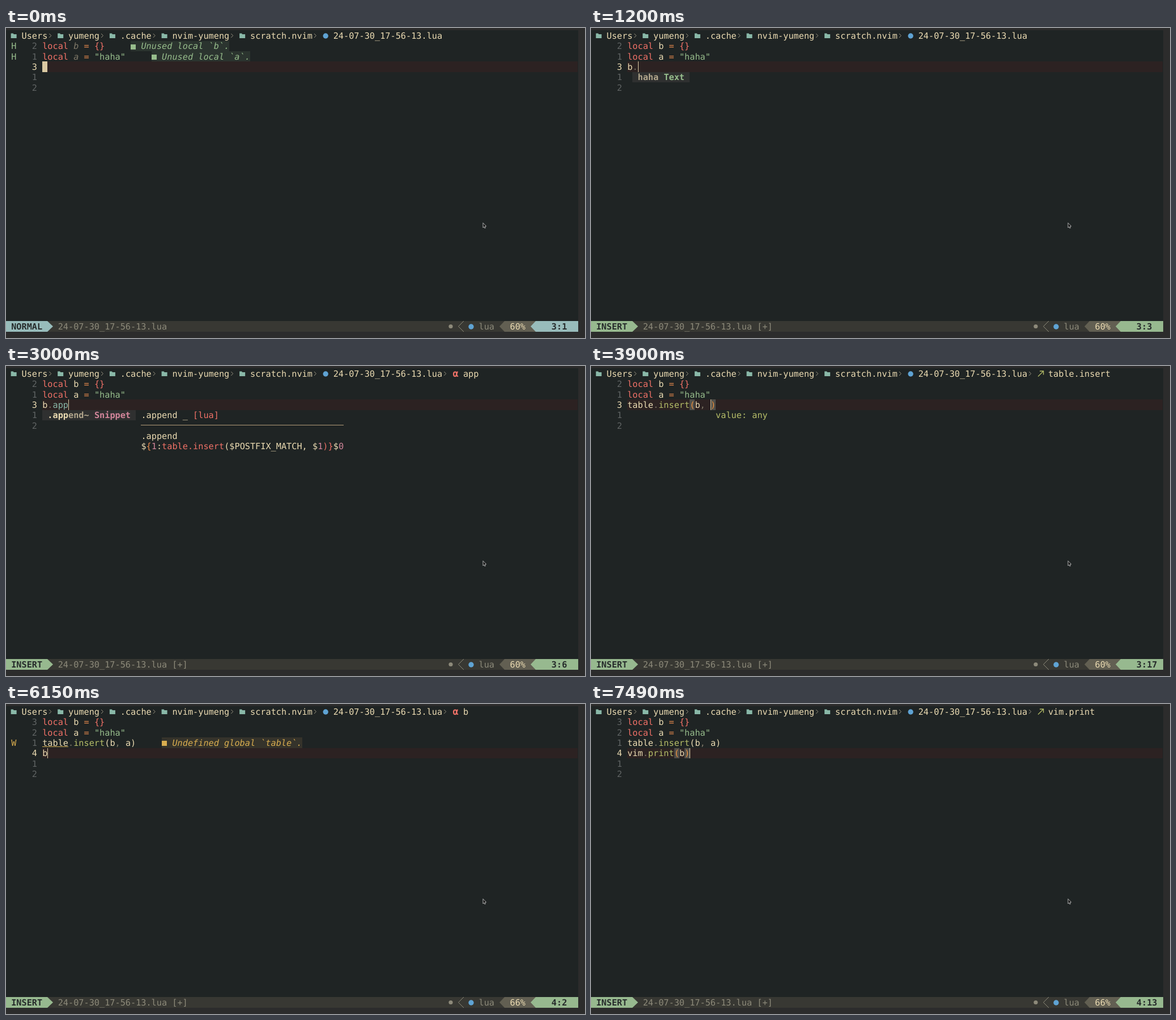
An HTML page with a canvas for the animation above (8000 ms loop, 1022 px wide and 548 px high).

```html
<!DOCTYPE html>
<html lang="en">
<head>
<meta charset="utf-8">
<title>Postfix snippets in an editor</title>
<style>
html, body { margin: 0; width: 100%; height: 100%; overflow: hidden; background: #2c2c2c; }
canvas { display: block; }
</style>
</head>
<body>
<canvas id="stage" width="1022" height="548"></canvas>
<script>
const ctx = document.getElementById('stage').getContext('2d');
const CELL = 9.17, ROW = 18.36, TOP = 4.4, LOOP = 8000;
const BG = '#1f2424', BAR = '#383833', PERCENT = '#625f52', CURSOR = '#dac9a2';

// Colour codes used in marked-up text: "§rlocal §fb" is red, then foreground.
const INK = {
  f: '#ebdbb2', r: '#f07167', o: '#e78a4e', g: '#97bd8c', y: '#b5bd68', a: '#89b8a8',
  p: '#d3869b', d: '#7f7868', t: '#b3a78d', n: '#606464', w: '#d9ad4f', m: '#f0923f',
  s: '#8d8a7a', k: '#262b2b', c: '#9a9582', l: '#5fa3d4'
};

const x = col => Math.round(col * CELL);
const y = row => Math.round(TOP + row * ROW);

function fill(color, col, row, width, height = 1) {
  ctx.fillStyle = color;
  ctx.fillRect(x(col), y(row), x(col + width) - x(col), y(row + height) - y(row));
}

function put(col, row, markup, font = '') {
  const parts = markup.split(/§(.)/);
  ctx.font = `${font} 15.23px "DejaVu Sans Mono", monospace`;
  for (let i = 1; i < parts.length; i += 2) {
    const text = parts[i + 1];
    if (parts[i] === 'm') fill('#504f4a', col, row, text.length);
    ctx.fillStyle = INK[parts[i]];
    ctx.fillText(text, col * CELL, TOP + row * ROW + 14.4);
    col += text.length;
  }
}

function poly(color, points, stroke = 0) {
  ctx.beginPath();
  points.forEach(([px, py]) => ctx.lineTo(px, py));
  if (stroke) {
    ctx.strokeStyle = color;
    ctx.lineWidth = stroke;
    ctx.stroke();
  } else {
    ctx.fillStyle = color;
    ctx.fill();
  }
}

function dot(color, cx, cy, r) {
  ctx.fillStyle = color;
  ctx.beginPath();
  ctx.arc(cx, cy, r, 0, 7);
  ctx.fill();
}

const plain = markup => markup.replace(/§./g, '');

// Buffer text
const LINE_B = '§rlocal §fb §o= §r{}', LINE_A = '§rlocal §fa §o= §g"haha"';
const INSERT_OPEN = '§ftable§d.§yinsert';
const LINE_INSERT = INSERT_OPEN + '§f(b§d, §fa)';
const member = name => `§fb§d.§a${name}`;

// Completion menus: column of the labels, then [label, kind] with the first selected
const menuLocals = {
  col: 7, match: [0, 1], items: [['b', '§aVariable'], ['break', '§rKeyword']],
  doc: ['§rlocal §fb: §ytable']
};
const menuArgs = {
  col: 23, match: [0, 1], items: [['a', '§aVariable'], ['assert(v, m~', '§yFunction']],
  doc: ['§rlocal §fa: §ystring §o= §g"haha"']
};
const menuWords = (...words) => ({ col: 9, items: words.map(w => [w, '§gText']) });
const menuPostfix = (typed, body, ...names) => ({
  col: 8, match: [0, typed + 1], items: names.map(n => [`.${n}~`, '§pSnippet']),
  doc: [`§f.${names[0]} _ §r[lua]`, '', `§f.${names[0]}`, body]
});
const appendBody = '§f$§o{§p1§f:§rtable.insert§f($POSTFIX_MATCH, $§p1§r)}§f$§p0';
const printBody = '§f$§o{§p1§f:§rvim.print§f($POSTFIX_MATCH§r)}§f$§p0';

const local = name => ['α', name], call = name => ['↗', name];

// Each step changes some of the state left by the one before.
const STEPS = [
  [0, { insert: false, dirty: false, line: 3, col: 7, text: '', crumbs: [], hints: true,
        warn: false, refs: false, menu: null, sig: 0 }],
  [600, { insert: true }],
  [900, { hints: false, dirty: true, text: '§fb', col: 8, crumbs: [local('b')] }],
  [1050, { menu: menuLocals }],
  [1200, { text: '§fb§d.', col: 9, crumbs: [], menu: menuWords('haha') }],
  [2700, { text: member('a'), col: 10, crumbs: [local('a')] }],
  [2850, { text: member('ap'), col: 11, crumbs: [local('ap')], menu: menuPostfix(2, appendBody, 'append') }],
  [3000, { text: member('app'), col: 12, crumbs: [local('app')], menu: menuPostfix(3, appendBody, 'append') }],
  [3600, { text: '§otable§d.§yinsert§m(§fb§d, §m)', col: 23, crumbs: [call('table.insert')], menu: null }],
  [3750, { sig: 4 }],
  [3900, { text: INSERT_OPEN + '§m(§fb§d, §m)' }],
  [4650, { text: INSERT_OPEN + '§m(§fb§d, §fa§m)', col: 24, crumbs: [call('table.insert'), local('a')] }],
  [4800, { sig: 2, menu: menuArgs }],
  [4950, { insert: false, dirty: false, text: LINE_INSERT, col: 23, sig: 0, menu: null, warn: true }],
  [5100, { refs: true }],
  [5400, { insert: true, dirty: true, line: 4, col: 7, text: '', crumbs: [], refs: false }],
  [6150, { text: '§fb', col: 8, crumbs: [local('b')] }],
  [6300, { warn: false, menu: menuLocals }],
  [6450, { text: '§fb§d.', col: 9, crumbs: [], menu: menuWords('haha', 'table', 'insert') }],
  [6590, { text: member('p'), col: 10, crumbs: [local('p')] }],
  [6740, { text: member('pr'), col: 11, crumbs: [local('pr')], menu: menuPostfix(2, printBody, 'print', 'pairs') }],
  [6890, { text: member('pri'), col: 12, crumbs: [local('pri')], menu: menuPostfix(3, printBody, 'print') }],
  [7490, { text: '§fvim§d.§yprint§m(§fb§m)', col: 19, crumbs: [call('vim.print')], menu: null }]
];

function stateAt(time) {
  return Object.assign({}, ...STEPS.filter(([start]) => start <= time).map(([, change]) => change));
}

function chevron(col) {
  const cx = col * CELL + 3;
  poly(INK.c, [[cx, 10], [cx + 3.4, 13.5], [cx, 17]], 1);
}

function folder(col) {
  const l = col * CELL - 0.5;
  poly(INK.a, [[l, 9.5], [l + 4, 9.5], [l + 5, 11], [l + 10, 11], [l + 10, 18], [l, 18]]);
}

function drawCrumbs(crumbs) {
  let col = 1;
  for (const name of ['Users', 'yumeng', '.cache', 'nvim-yumeng', 'scratch.nvim']) {
    folder(col);
    put(col + 2, 0, '§f' + name);
    chevron(col + 2 + name.length);
    col += name.length + 4;
  }
  dot(INK.l, col * CELL + 4.8, 14, 4.7);
  put(col + 2, 0, '§f24-07-30_17-56-13.lua');
  col += 23;
  for (const [icon, name] of crumbs) {
    chevron(col);
    const l = (col + 2) * CELL;
    if (icon === 'α') {
      ctx.font = 'bold 17px "DejaVu Sans Mono", monospace';
      ctx.fillStyle = INK.r;
      ctx.fillText('α', l, 18.5);
    } else {
      poly(INK.y, [[l + 0.5, 18.5], [l + 10, 9]], 1.3);
      poly(INK.y, [[l + 3.5, 9], [l + 10, 9], [l + 10, 15.5]], 1.3);
    }
    put(col + 4, 0, '§f' + name);
    col += name.length + 4;
  }
}

function diagnostic(row, sign, code, bg, lineLength, message) {
  const col = lineLength + 12;
  put(1, row, `§${code}${sign}`);
  fill(bg, col, row, message.length + 2);
  ctx.fillStyle = INK[code];
  ctx.fillRect(x(col), y(row) + 6, 9, 9);
  put(col + 2, row, `§${code}${message}`, 'italic');
}

function underline(color, col, row, width) {
  ctx.fillStyle = color;
  ctx.fillRect(x(col), Math.round(TOP + row * ROW + 16), x(col + width) - x(col), 1);
}

function drawBuffer(s) {
  fill('#2c2222', 7, s.line, 103);
  for (let row = 1; row <= s.line + 2; row++) {
    const offset = Math.abs(row - s.line);
    put(5, row, offset ? `§n${offset}` : `§f${s.line}`);
  }
  [LINE_B, LINE_A, LINE_INSERT].slice(0, s.line - 1).forEach((line, i) => put(7, i + 1, line));
  put(7, s.line, s.text);

  if (s.hints) {
    ['b', 'a'].forEach((name, i) => {
      fill(BG, 13, i + 1, 1);
      put(13, i + 1, '§d' + name, 'italic');
      diagnostic(i + 1, 'H', 'g', '#2b342f', i ? 16 : 12, `Unused local \`${name}\`.`);
    });
  }
  if (s.warn) {
    diagnostic(3, 'W', 'w', '#35332b', 18, 'Undefined global `table`.');
    underline(INK.w, 7, 3, 5);
  }
  if (s.refs) underline(INK.f, 13, 2, 1);

  if (s.insert) {
    ctx.fillStyle = CURSOR;
    ctx.fillRect(x(s.col), y(s.line), 1, y(s.line + 1) - y(s.line));
  } else {
    fill(CURSOR, s.col, s.line, 1);
    put(s.col, s.line, '§k' + (plain(s.text)[s.col - 7] || ' '));
  }
}

function drawMenu({ col, items, match = [0, 0], doc = [] }, top) {
  const widest = i => Math.max(...items.map(item => plain(item[i]).length));
  const labels = widest(0), width = labels + widest(1) + 3;
  items.forEach(([label, kind], i) => {
    const row = top + i, font = i ? '' : 'bold', [from, to] = match;
    fill(i ? '#1c1f20' : '#2f3030', col - 1, row, width);
    put(col, row, `§t${label.slice(0, from)}§f${label.slice(from, to)}§t${label.slice(to)}`, font);
    put(col + labels + 1, row, kind, font);
  });
  if (!doc.length) return;
  const left = col + width;
  const docWidth = Math.max(...doc.map(line => plain(line).length));
  fill(BG, left - 1, top, docWidth + 2, doc.length);
  doc.forEach((line, i) => {
    if (line) return put(left, top + i, line);
    ctx.fillStyle = '#b39c78';
    ctx.fillRect(x(left), Math.round(TOP + (top + i + 0.5) * ROW) - 1, x(docWidth), 1);
  });
}

function drawStatus(s) {
  const row = 28, t = y(row), b = y(row + 1), mid = (t + b) / 2;
  const mode = s.insert ? '#97b98f' : '#98bcbb';
  fill(BAR, 0, row, 110.1);
  fill(mode, 0, row, 8);
  poly(mode, [[x(8), t], [x(9), mid], [x(8), b]]);
  put(1, row, s.insert ? '§kINSERT' : '§kNORMAL', 'bold');
  put(10, row, '§s24-07-30_17-56-13.lua' + (s.dirty ? ' [+]' : ''));

  dot(INK.s, 785, mid, 3.6);
  poly(INK.s, [[808, t], [798.5, mid], [808, b]], 1);
  dot(INK.l, 821, mid + 0.5, 4.7);
  put(91, row, '§slua');

  fill(PERCENT, 96, row, 6);
  poly(PERCENT, [[x(96), t], [x(95), mid], [x(96), b]]);
  put(97, row, s.line === 3 ? '§f60%' : '§f66%');
  fill(mode, 102, row, 8.1);
  poly(mode, [[x(102), t], [x(101), mid], [x(102), b]]);
  put(105, row, `§k${s.line}:${s.col - 6}`, 'bold');
}

function drawPointer() {
  const shape = [[842, 344.5], [842, 353], [843.8, 351.4], [845, 354], [846.4, 353.2], [845.3, 350.8], [847.6, 350.4], [842, 344.5]];
  poly('#111', shape);
  poly('#d8d8d8', shape, 0.8);
}

function draw(now) {
  const s = stateAt(now % LOOP);
  ctx.fillStyle = '#2c2c2c';
  ctx.fillRect(0, 0, 1022, 548);
  fill(BG, 0, 0, 110.1, 29);
  drawCrumbs(s.crumbs);
  drawBuffer(s);
  if (s.menu) drawMenu(s.menu, s.line + 1);
  if (s.sig) put(24, s.sig, '§yvalue: any');
  drawStatus(s);
  drawPointer();
}

ctx.textRendering = 'geometricPrecision';
const start = performance.now();
function tick() {
  draw(performance.now() - start);
  requestAnimationFrame(tick);
}
tick();
</script>
</body>
</html>
```
